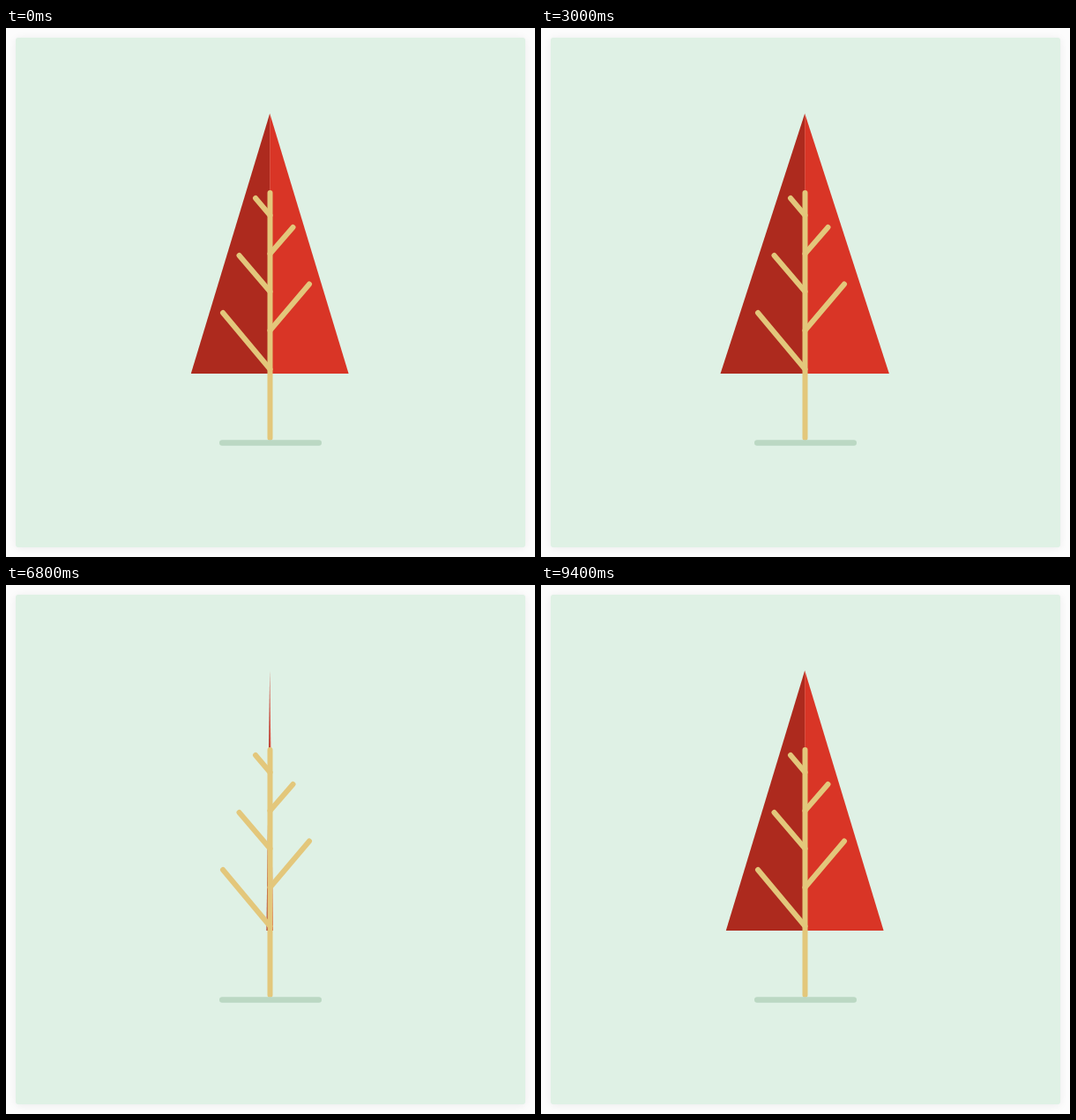
An HTML page with a canvas that plays this animation: 600x600 px, repeating every 9.5 s.

```html
<!DOCTYPE html>
<html lang="en">
<head>
<meta charset="utf-8">
<title>Growing tree</title>
<style>
  html, body { margin: 0; width: 100%; height: 100%; overflow: hidden; background: #fcfcfc; }
  .card {
    position: absolute; left: 11px; top: 11px; width: 578px; height: 578px;
    border-radius: 3px; background: #dff1e5; box-shadow: 0 1px 10px rgba(0, 0, 0, .07);
  }
  canvas { position: absolute; left: 0; top: 0; }
</style>
</head>
<body>
<div class="card"></div>
<canvas id="stage" width="600" height="600"></canvas>
<script>
const ctx = document.getElementById('stage').getContext('2d');

const LOOP = 9500;    // the clip restarts here, mid-cycle
const CYCLE = 4250;   // one growth of the tree
const FIRST = 1700;   // the tree is cleared and regrows at this time
const LEAF_START = 842, LEAF_TIME = 1000;
const MID = 299.2, TRUNK = 299.5;

// [tip x, tip y, y on the trunk, delay], bottom to top
const branches = [
  [246, 323, 387, 260],
  [344, 290.5, 343, 310],
  [264.5, 258, 299, 360],
  [325.5, 226, 256, 410],
  [283, 193, 212.5, 460]
];

const progress = (t, start, length) => Math.min(1, Math.max(0, (t - start) / length));
const easeOut = p => 1 - (1 - p) ** 3;
const backOut = p => 1 + 2.70158 * (p - 1) ** 3 + 1.70158 * (p - 1) ** 2;

function line(color, width, x1, y1, x2, y2) {
  ctx.strokeStyle = color;
  ctx.lineWidth = width;
  ctx.beginPath();
  ctx.moveTo(x1, y1);
  ctx.lineTo(x2, y2);
  ctx.stroke();
}

function grow(p, x1, y1, x2, y2) {
  if (p > 0) line('#e3c77b', 6, x1, y1, x1 + (x2 - x1) * p, y1 + (y2 - y1) * p);
}

function half(color, width) {
  ctx.fillStyle = color;
  ctx.beginPath();
  ctx.moveTo(MID, 97);
  ctx.lineTo(MID + width, 392);
  ctx.lineTo(MID, 392);
  ctx.fill();
}

function draw(time) {
  const t = (time % LOOP - FIRST + CYCLE) % CYCLE;
  ctx.clearRect(0, 0, 600, 600);
  ctx.lineCap = 'round';

  const leaf = progress(t, LEAF_START, LEAF_TIME);
  if (leaf > 0) {
    const width = 89.4 * backOut(leaf);
    half('#ad2a1e', -width);
    half('#d93526', width);
  }

  grow(easeOut(progress(t, 100, 500)), TRUNK, 465, TRUNK, 187);
  for (const [x, y, root, delay] of branches) {
    grow(easeOut(progress(t, delay, 350)), TRUNK, root, x, y);
  }

  const ground = 54.8 * easeOut(progress(t, 0, 500));
  if (ground > 0) line('#bbd8c3', 6.4, 300 - ground, 470.5, 300 + ground, 470.5);
}

function frame() {
  draw(performance.now());
  requestAnimationFrame(frame);
}
frame();
</script>
</body>
</html>
```
